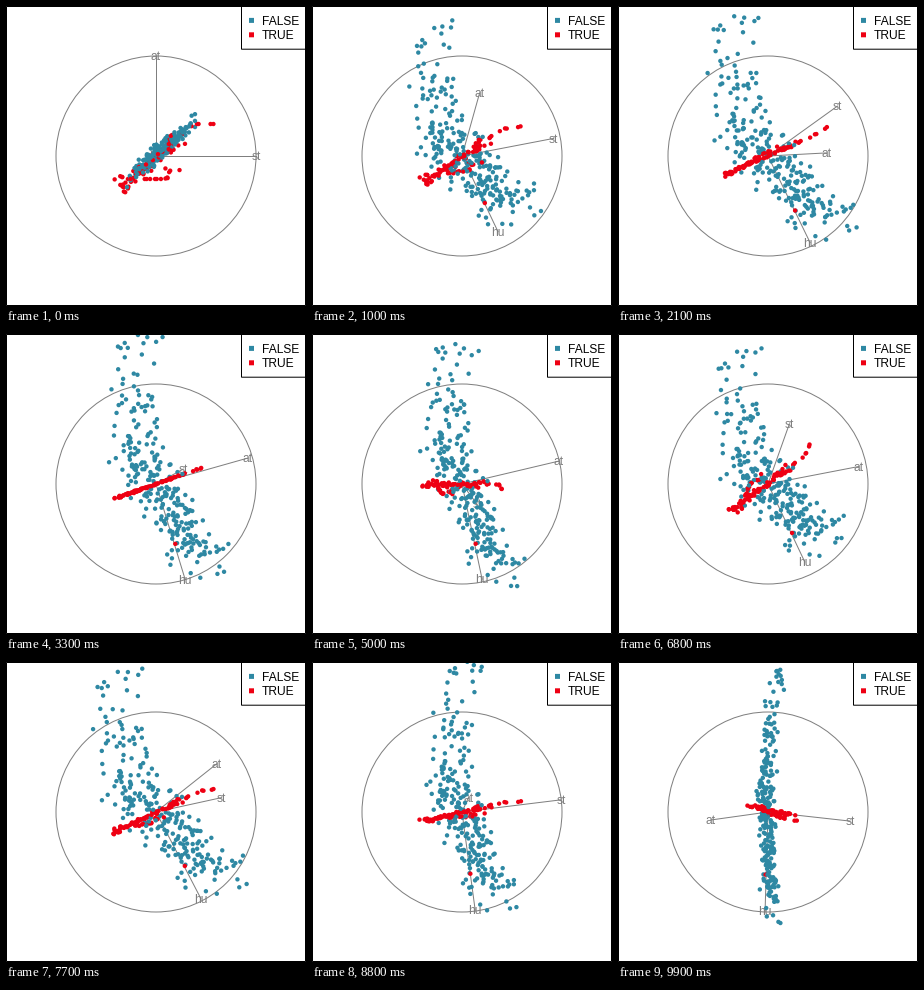
Write a matplotlib script that moves like this. It is 300 by 300 pixels and loops after 10000 ms.

```python
import numpy as np
import matplotlib.pyplot as plt
from matplotlib.animation import FuncAnimation
from matplotlib.patches import Circle, Rectangle

SIZE, DPI, CENTER, RADIUS = 300, 100, 150, 100
PX = 72 / DPI
ROW = 14.4
TEAL, RED, GREY = "#2E88A3", "#EE0013", "#7F7F7F"
FONT = dict(family="Liberation Sans", fontsize=12 * PX, va="baseline")
NAMES = ("st", "at", "hu")

# Tour stops: step, horizontal and vertical loading of st, at, hu
STOPS = [
    (0, (1, 0, 0), (0, 1, 0)),
    (11, (.90, .21, .38), (.21, .56, -.80)),
    (21, (.69, .58, .42), (.50, .03, -.87)),
    (33, (.27, .91, .29), (.15, .26, -.96)),
    (50, (.15, .97, .20), (-.20, .23, -.95)),
    (68, (.21, .90, .37), (.60, .17, -.78)),
    (77, (.65, .60, .45), (.14, .48, -.87)),
    (94, (.91, -.41, -.02), (-.04, -.05, -.99)),
    (97, (.82, -.57, -.03), (-.09, -.08, -.99)),
]


def frame_of(x, y):
    """Nearest orthonormal pair, completed to a rotation matrix."""
    u, _, v = np.linalg.svd(np.array([x, y], float), full_matrices=False)
    pair = u @ v
    return np.vstack([pair, np.cross(*pair)])


def turn(rot, t):
    """The fraction t of a rotation."""
    angle = np.arccos(np.clip((np.trace(rot) - 1) / 2, -1, 1))
    if angle < 1e-6:
        return np.eye(3)
    k = (rot - rot.T) / (2 * np.sin(angle))
    return np.eye(3) + np.sin(angle * t) * k + (1 - np.cos(angle * t)) * k @ k


STEPS = [s[0] for s in STOPS]
FRAMES = [frame_of(x, y) for _, x, y in STOPS]


def basis(i):
    step = i - (i >= 82) - (i >= 96)  # the tour rests once at two targets
    j = min(np.searchsorted(STEPS, step, side="right") - 1, len(STEPS) - 2)
    t = (step - STEPS[j]) / (STEPS[j + 1] - STEPS[j])
    a, b = FRAMES[j], FRAMES[j + 1]
    return (turn(b @ a.T, t) @ a)[:2]


def to_screen(p):
    return CENTER + RADIUS * p * (1, -1)


def make_observed(rng):
    """Air follows sea temperature; both rise away from medium humidity."""
    hu = np.r_[rng.triangular(-.9, .2, 1.15, 225), rng.uniform(-1.48, -.7, 32)]
    st = .25 * np.abs(hu + .3) - .1 + rng.triangular(-.26, 0, .26, hu.size)
    st = np.clip(st, -.33, .39)
    at = .84 * st + .01 + rng.normal(0, .04, hu.size)
    return np.c_[st, at, hu]


def make_imputed(rng):
    """Nearly flat in humidity: core, cold end, warm tail and a low fringe."""
    core = rng.uniform(-.28, .18, 54)
    cold = rng.normal(-.31, .05, 14)
    tail = rng.uniform(.25, .6, 8)
    fringe = rng.uniform(-.15, .33, 17)
    st = np.r_[core, cold, tail, fringe]
    at = np.r_[.84 * core - .02 + rng.normal(0, .04, core.size),
               rng.normal(-.29, .05, cold.size),
               np.minimum(.84 * tail, .32),
               np.maximum(.84 * fringe - rng.uniform(.05, .35, fringe.size), -.23)]
    hu = .05 * st - .064 * at + rng.normal(0, .004, st.size)
    return np.vstack([np.c_[st, at, hu], (0, .01, .63)])


rng = np.random.default_rng(12)
observed, imputed = make_observed(rng), make_imputed(rng)
data = np.vstack([observed, imputed])
colors = np.array([TEAL] * len(observed) + [RED] * len(imputed))
order = rng.permutation(len(data))
data, colors = data[order], colors[order]

fig = plt.figure(figsize=(SIZE / DPI, SIZE / DPI), dpi=DPI, facecolor="white")
ax = fig.add_axes([0, 0, 1, 1])
ax.set(xlim=(0, SIZE), ylim=(SIZE, 0))
ax.axis("off")


def box(x, y, w, h, z, **style):
    ax.add_patch(Rectangle((x, y), w, h, zorder=z, snap=False, **style))


ax.add_patch(Circle((CENTER, CENTER), RADIUS, fill=False, ec=GREY, lw=PX, zorder=1))
spokes = [ax.plot([], [], color=GREY, lw=PX, zorder=1)[0] for _ in NAMES]
labels = [ax.text(0, 0, n, color=GREY, ha="center", zorder=1.5, **FONT) for n in NAMES]
dots = ax.scatter(data[:, 0], data[:, 1], s=(4.4 * PX) ** 2, c=colors,
                  linewidths=0, zorder=2)

box(235.5, .5, SIZE - 236, 3 * ROW - .5, 3, fc="white", ec="black", lw=PX)
for row, color, word in ((1, TEAL, "FALSE"), (2, RED, "TRUE")):
    y = row * ROW
    box(243, y - 2.5, 5, 5, 4, fc=color, lw=0)
    ax.text(255.7, y + 4.4, word, color="black", zorder=4, **FONT)
box(.5, .5, SIZE - 1, SIZE - 1, 5, fill=False, ec="black", lw=PX)


def draw(i):
    b = basis(i)
    dots.set_offsets(to_screen(data @ b.T))
    for (x, y), spoke, label in zip(to_screen(b.T), spokes, labels):
        spoke.set_data([CENTER, x], [CENTER, y])
        label.set_position((x, y + 4.2))
    return [dots, *spokes, *labels]


anim = FuncAnimation(fig, draw, frames=100, interval=100, repeat=True, repeat_delay=0)
plt.show()
```
